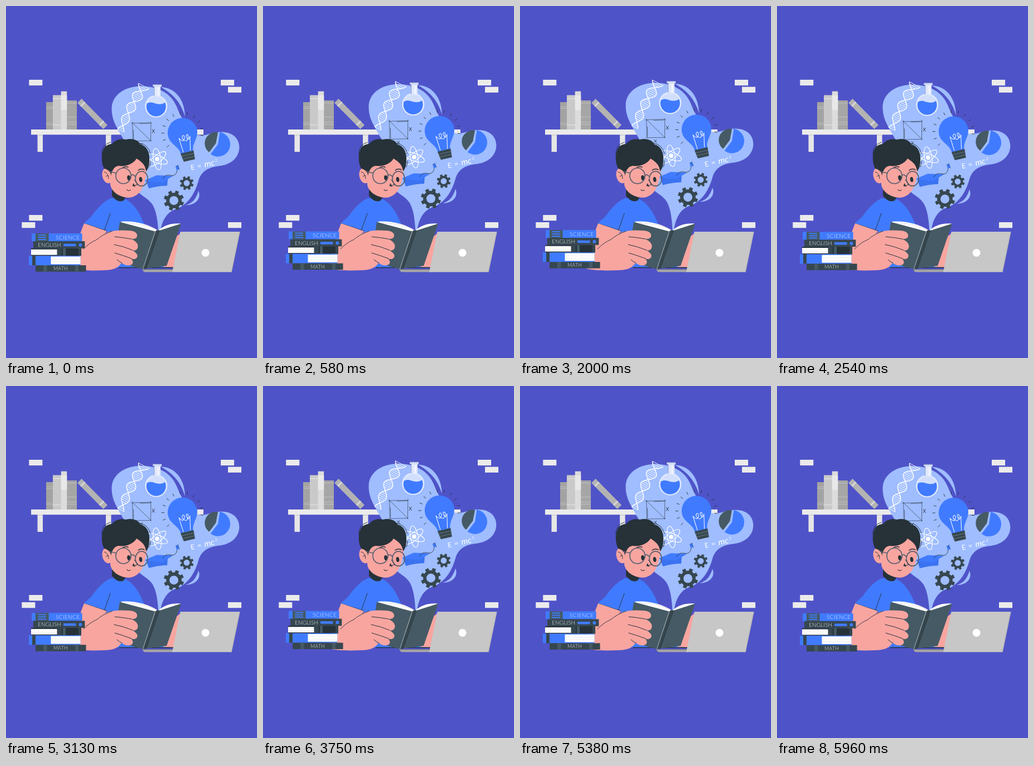
Animation of 450x630 px, one loop 6000 ms. Source, as an HTML page with a canvas:

```html
<!DOCTYPE html>
<html lang="en">
<head>
<meta charset="utf-8">
<title>Reading</title>
<style>
html, body { margin: 0; width: 100%; height: 100%; overflow: hidden; background: #4f53c8; }
canvas { display: block; width: 450px; height: 630px; }
</style>
</head>
<body>
<canvas id="stage"></canvas>
<script>
const W = 450, H = 630, PERIOD = 3000, LIFT = 9;
const BG = '#4f53c8', BLUE = '#407bff', MIST = '#9fbdff', INK = '#263238',
  SLATE = '#455a64', DARK = '#37474f', SKIN = '#f8a5a0', WHITE = '#fff';
const canvas = document.getElementById('stage');
const dpr = window.devicePixelRatio || 1;
canvas.width = W * dpr;
canvas.height = H * dpr;
const c = canvas.getContext('2d');

function fill(d, color) {
  c.fillStyle = color;
  c.fill(new Path2D(d));
}
function line(d, color = INK, width = 1) {
  c.strokeStyle = color;
  c.lineWidth = width;
  c.stroke(new Path2D(d));
}
function box(x, y, w, h, color) {
  c.fillStyle = color;
  c.fillRect(x, y, w, h);
}
function oval(x, y, rx, ry, color, turn = 0) {
  c.beginPath();
  c.ellipse(x, y, rx, ry, turn, 0, Math.PI * 2);
  c.fillStyle = color;
  c.fill();
}
function ring(x, y, rx, ry, color, width, turn = 0) {
  c.beginPath();
  c.ellipse(x, y, rx, ry, turn, 0, Math.PI * 2);
  c.strokeStyle = color;
  c.lineWidth = width;
  c.stroke();
}
function slice(x, y, r, from, to, color) {
  c.beginPath();
  c.moveTo(x, y);
  c.arc(x, y, r, from, to);
  c.fillStyle = color;
  c.fill();
}
function label(s, x, y, size, color, spacing = 0, weight = 400) {
  c.font = `${weight} ${size}px Lato, sans-serif`;
  c.letterSpacing = spacing + 'px';
  c.fillStyle = color;
  c.fillText(s, x, y);
}
function placed(x, y, turn, draw) {
  c.save();
  c.translate(x, y);
  c.rotate(turn);
  draw();
  c.restore();
}

function wall() {
  box(0, 0, W, H, BG);
  for (const [x, y] of [[41.3, 132], [385, 132], [398, 144.7], [41.3, 374], [28.3, 387], [398, 387]])
    box(x, y, 24, 10.2, '#ebebeb');
}

function shelf() {
  for (const x of [56.5, 179]) {
    box(x, 230, 9.5, 31, '#e6e6e6');
    box(x, 230, 9.5, 2, '#d0d0d0');
  }
  box(45, 221, 309, 9.3, '#ebebeb');
  box(72, 172, 12.5, 49, '#a3a3a3');
  for (const y of [180, 183, 209, 212]) box(72, y, 12.5, 1, '#bdbdbd');
  box(84, 159.5, 15, 61.5, '#c9c9c9');
  box(84, 165, 15, 1.4, '#dedede');
  box(84, 212, 15, 1.4, '#dedede');
  box(109, 169, 18, 52, '#a6a6a6');
  for (const y of [173, 198, 207, 211]) box(109, y, 18, 1.2, '#bdbdbd');
  box(98.7, 152.7, 10.5, 68.3, '#dcdcdc');
  box(98.7, 160, 10.5, 26, '#e8e8e8');
  placed(135.5, 166, 0.79, () => {
    box(0, 0, 66, 10.5, '#b3b3b3');
    box(7, 0, 3, 10.5, '#d6d6d6');
    box(55, 0, 3, 10.5, '#d6d6d6');
  });
}

function blob() {
  fill('M274 425 C273 395 272 372 263 356 C256 345 245 341 237 333 C226 302 224 264 212 241' +
    ' C200 219 189.5 206 189.5 184 C189.5 160 212 143.5 243 143.5 C273 144 296 156 306 180' +
    ' C314 200 327 224 344 231 C358 234 369 225 387 225.5 C407 226 418 237 418.3 253' +
    ' C418 271 404 283 385 286 C364 288 350 295 345 313 C339 334 329 351 311 361' +
    ' C288 368 277 381 274 425Z', MIST);
  fill('M277 145 C303 146 320 166 321 198 C314 174 300 157 277 145Z', MIST);
  fill('M345 331 C351 344 340 357 322 356.5 C336 352 341 344 345 331Z', MIST);
}

function dna() {
  const at = (s, side) => {
    const wave = side * Math.sin(Math.PI * (s - 0.12) / 0.26) * (10.5 - 4 * s);
    return [247 - 48 * s + 7 * s * s + wave * 0.88, 143.5 + 70 * s + 9 * s * s + wave * 0.46];
  };
  c.strokeStyle = WHITE;
  for (const side of [-1, 1]) {
    c.beginPath();
    for (let i = 0; i <= 80; i++) c.lineTo(...at(i / 80, side));
    c.lineWidth = 1.4;
    c.stroke();
  }
  c.beginPath();
  for (let i = 0; i <= 26; i++) {
    c.moveTo(...at(i / 26, -1));
    c.lineTo(...at(i / 26, 1));
  }
  c.lineWidth = 0.9;
  c.stroke();
}

function flask() {
  oval(269.3, 179.5, 20, 20, '#e1e9fc');
  box(265.5, 143, 11.5, 22, '#e1e9fc');
  box(263.3, 140.5, 15.7, 3.7, '#d3dcf5');
  line('M263.3 140.5H279M265.8 144V161', '#6f7fb2', 0.7);
  oval(269.3, 179.5, 17.5, 17.5, '#d2dffc');
  fill('M252.6 174.5 Q258 171 266 174 Q278 178 285 172.5 A17.5 17.5 0 1 1 252.6 174.5Z', BLUE);
  line('M273 147V160', WHITE, 1.4);
}

function diagram() {
  line('M225 209.8 L260.5 208.8 M226.6 208 L227.4 241.5 M226 241.8 L260.5 241.2 M259.8 207.5 L259.4 242' +
    ' M227 209.5 L259.5 241 M240 210.6 L259 210 M228.4 222 L228.8 240', INK, 0.6);
  line('M262.3 221 L266.3 227 M266.3 221 L262 227 M240.6 245.5 L245 250.5 M244.7 245.5 L240.5 250.5', INK, 0.9);
}

function bulb() {
  const cx = 316.5, cy = 227;
  for (let i = 0; i < 12; i++) {
    const a = 2.4 + i * 0.365;
    const p = r => `${cx + r * Math.cos(a)} ${cy + r * Math.sin(a)}`;
    line(`M${p(33)}L${p(37.5)}`, INK, 0.9);
  }
  placed(cx, cy, -0.23, () => {
    fill('M-26.7 0 A26.7 26.7 0 1 1 26.7 0 C26.5 15 12 22 11.5 36 H-11.5 C-12 22 -26.5 15 -26.7 0Z', BLUE);
    line('M-6.5 34 L-8.5 8 Q-3 18 1 11 Q3 4 -1 5 Q-5 9 0 14 Q5 18 8 10 Q10 4 6 5 Q3 9 8 14 L11.5 9 L6.5 34', WHITE, 1);
    fill('M-12 35.5 H12 L11 51 H-9.5Z', DARK);
    line('M-11.6 40.5H11.6M-11 45.7H11.2', '#71818a', 0.8);
  });
}

function pie() {
  slice(376.3, 245.8, 20, 2.22, 4.9, SLATE);
  slice(380, 247.5, 22, -1.42, 2.22, BLUE);
}

function formula() {
  placed(332, 294, -0.21, () => {
    label('E', 0, 0, 12.5, WHITE);
    label('=', 12, 0, 13, WHITE);
    c.font = 'italic 400 15px Lato, sans-serif';
    c.fillText('mc', 25, 0);
    label('2', 45.5, -6, 6.5, WHITE);
  });
}

function atom() {
  for (const a of [0.35, 1.4, 2.45]) ring(271, 274, 19.5, 6.8, WHITE, 1.2, a);
  oval(271, 274, 4, 4, WHITE);
}

function cap() {
  fill('M251 312 L280 315 L290 309 L289 321.5 Q272 322 256 326.5Z', '#3a72f0');
  fill('M247 313 L270 303 L299.5 304 L280 316Z', BLUE);
  line('M281 309 Q285 301 294 303 Q305 306 307 294', INK, 0.8);
  fill('M304.3 287 L308.5 284.5 L311 291 L306 294.5Z', BLUE);
  line('M304.5 287.5 L309 285M308 288 L311 293', INK, 0.6);
}

function gear(x, y, r, root, hole, turn) {
  const step = Math.PI / 4;
  c.beginPath();
  for (let i = 0; i < 8; i++) {
    for (const [k, rad] of [[-0.29, root], [-0.22, r], [0.22, r], [0.29, root]]) {
      const a = turn + (i + k) * step;
      c.lineTo(x + rad * Math.cos(a), y + rad * Math.sin(a));
    }
  }
  c.closePath();
  c.moveTo(x + hole, y);
  c.arc(x, y, hole, 0, Math.PI * 2);
  c.fillStyle = DARK;
  c.fill('evenodd');
}

function ideas() {
  blob();
  dna();
  flask();
  diagram();
  bulb();
  pie();
  formula();
  atom();
  cap();
  gear(301, 348.2, 18.3, 14, 8, 0.35);
  gear(324, 317, 12.6, 9.5, 5.4, 0.35);
}

function body() {
  fill('M188 344 C172 351 161 366 152 378 L138 390 L181 403 L188 468 L290 468 L248 391 C241 373 230 352 212 345Z', BLUE);
  fill('M190 328 L216 340 L211 348 Q204 352 196 346 L190 340Z', INK);
  line('M187 371 Q182 386 176 402M139 389 L181 402.5', INK, 0.9);
  fill('M294 421 L314 406 L302 468 L282 467Z', SKIN);
  line('M203 468.3H301', INK, 1.4);
}

function head() {
  fill('M187 283 L187 319 C188 332 204 343 220 343 C236 342 244 330 248 316 C252 302 254 290 251 272 L215 264Z', SKIN);
  fill('M187 292 C178 286 171.5 293 172.5 303 C174 314 181 320 188 316Z', SKIN);
  line('M176 297 Q183 298 184 309M179 305 Q182 302 184 304', INK, 0.9);
  fill('M188 304 C188 297 184 293 176 291 C171 282 170 266 175 256 C178 249 186 247 190 247' +
    ' C196 239 206 237 215 239 C228 236 238 241 241 248 C252 250 258 262 257 275' +
    ' C257 284 256 290 251 296 C250 285 245 280 234 273 C228 284 211 288 202 286 C194 287 190 294 188 304Z', INK);
  line('M171.5 265 Q172 248 187 244M240 246 Q254 247 259 264M257 288 Q259 284 259 277', INK, 0.9);
  line('M208 290.5 Q213 286 219 288.5M237 294 Q242 290 248 293', INK, 1.5);
  oval(220.2, 307.5, 3, 4.6, INK, -0.15);
  oval(241.5, 310.5, 2.8, 4.5, INK, -0.15);
  ring(210.5, 304, 13.6, 14, '#59606f', 1.7);
  ring(243, 309, 11, 13.2, '#59606f', 1.7);
  line('M224 303 Q228 300 232.5 306M197 299 L185 296', '#59606f', 1.7);
  line('M230 311 L236.5 319.5 L230.5 321.5', INK, 1);
  fill('M228.5 317 L232 323.5 L226.5 322Z', INK);
  line('M217 328.5 Q218.5 332 223 329.5', INK, 1.1);
}

function openBook() {
  fill('M206 386 C228 384 255 390 273 402 C283 392 298 388 313 389.5 L290 440 L225 440Z', WHITE);
  line('M215 388 Q250 389 272 402', '#c5c5c5', 0.6);
  fill('M204 386.5 L267.5 403.5 L245 471 L193 456Z', SLATE);
  fill('M274.5 402 L314 389.5 L288 465 L250 470Z', SLATE);
  fill('M267.5 403.5 Q271 400 275 401.5 L251.5 470 L245 471Z', DARK);
  line('M267.5 404 L245.3 471', '#c6ced2', 0.8);
  line('M275 402 L251.5 469.5', INK, 0.8);
}

function arm() {
  fill('M140 389 L181 403 L177 407 C191 401 207 401 222 402 C232 403 236 407 235 412' +
    ' C234 417 228 417 224 417 C234 421 238 427 236 433 C234 438 229 438 226 437' +
    ' C235 442 238 447 234 451 C231 454 227 453 224 452 C228 456 229 460 225 463' +
    ' C218 466 212 463 207 460 C201 469 192 473 174 473 C150 474 130 473 119 470' +
    ' C117 460 125 444 129 424 C131 412 135 402 140 389Z', SKIN);
  line('M139 435 Q149 424 163 418 Q173 409 190 403', INK, 0.9);
  line('M195 413 Q209 414 225 417M194 427 Q210 430 227 437M195 442 Q209 446 225 452M199 454 Q203 458 208 460', INK, 1);
}

function laptop() {
  fill('M245 471.5 H301 V476.2 H249 Q245 475 245 471.5Z', '#a6a6a6');
  line('M245 471.6H300', '#737373', 0.8);
  fill('M312.5 404 H419.5 L404.5 476.2 H298Z', '#c7c7c7');
  line('M418.8 404.5 L404 476', '#b5b5b5', 1.2);
  oval(357.6, 441.7, 7, 7, WHITE);
}

function stack() {
  box(46, 407, 90.5, 14, BLUE);
  box(53, 407, 23.5, 14, SLATE);
  for (const y of [409, 413, 417]) box(57.5, y, 14.5, 2, BLUE);
  label('SCIENCE', 89, 417.6, 10, '#dbe6ff', 0.4, 300);

  box(49, 421, 92.3, 12.7, DARK);
  label('ENGLISH', 57, 431.2, 10, '#e4e8ea', 0.15, 300);
  box(103, 425.5, 22.5, 4.6, BLUE);
  oval(133.4, 427.8, 3, 3, BLUE);

  box(45, 433.7, 90, 13.3, INK);
  box(45, 435.7, 46.5, 9.8, WHITE);
  line('M46 439H91M46 442.5H91', '#dfdfdf', 0.6);
  box(92, 433.7, 8, 13.3, DARK);
  box(102, 433.7, 5, 13.3, SLATE);
  box(130, 433.7, 5, 13.3, DARK);

  box(41, 447, 92.5, 17, BLUE);
  box(47, 447, 6, 17, DARK);
  box(80.5, 448.4, 53, 13.8, WHITE);
  line('M81 453.3H133M81 457.6H133', '#dfdfdf', 0.6);

  box(53, 464, 90.5, 11.5, DARK);
  box(67, 464, 6.5, 11.5, SLATE);
  box(124, 464, 6, 11.5, SLATE);
  label('MATH', 85, 473.2, 9, '#e4e8ea', 0.1, 300);
}

function floating(dy, draw) {
  c.save();
  c.translate(0, dy);
  draw();
  c.restore();
}

function render(now) {
  const phase = (now % PERIOD) / PERIOD;
  const dy = -LIFT * (1 - Math.abs(1 - 2 * phase));
  c.setTransform(dpr, 0, 0, dpr, 0, 0);
  c.lineCap = c.lineJoin = 'round';
  wall();
  shelf();
  floating(dy, ideas);
  body();
  head();
  openBook();
  arm();
  laptop();
  floating(dy, stack);
}

let start;
function tick(now) {
  start ??= now;
  render(now - start);
  requestAnimationFrame(tick);
}
render(0);
requestAnimationFrame(tick);
</script>
</body>
</html>
```
